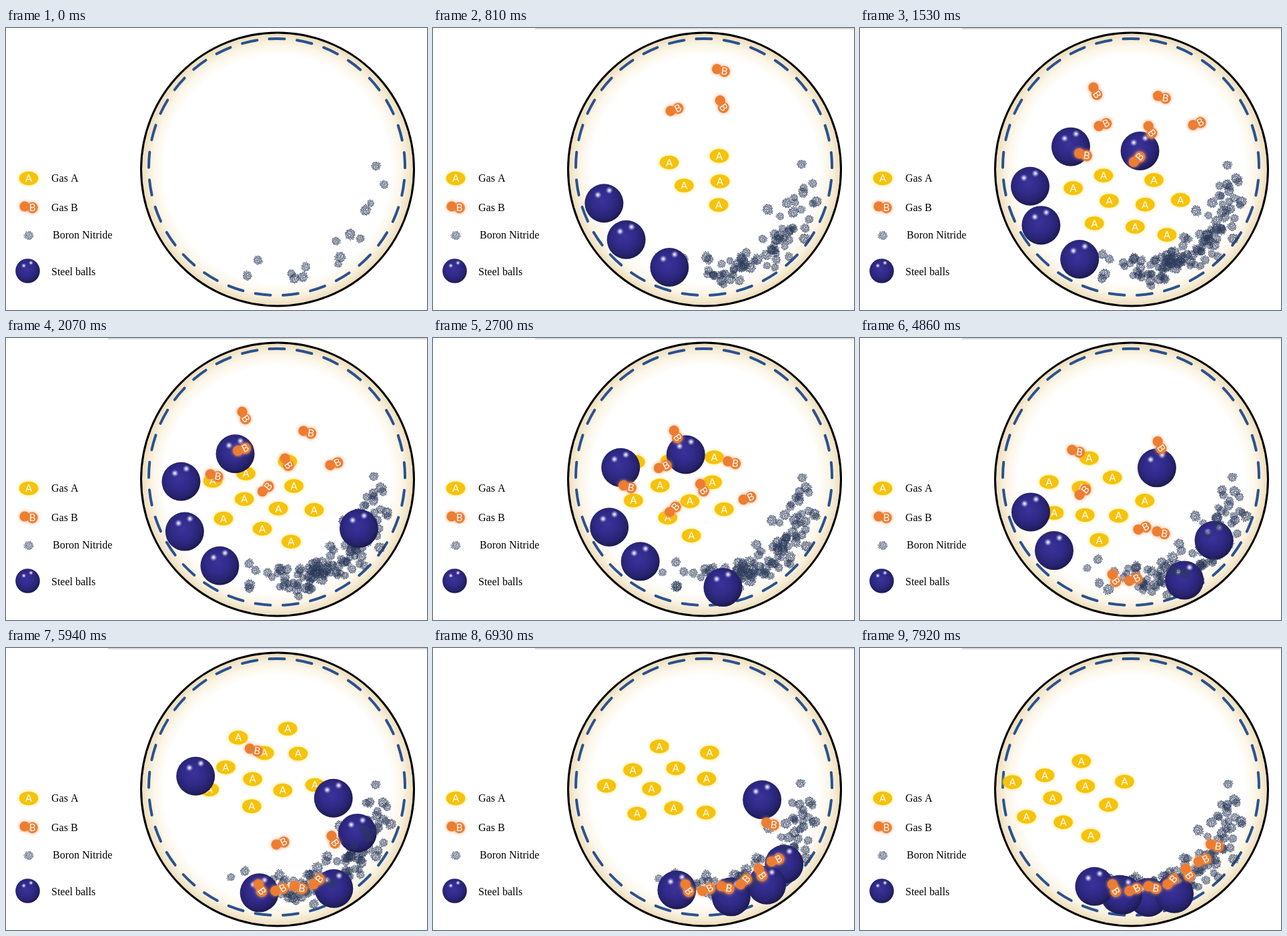
Recreate the animation shown at these times as an HTML page with a canvas. Size 631 by 422 pixels, loop 8 s.

```html
<!DOCTYPE html>
<html lang="en">
<head>
<meta charset="utf-8">
<title>Ball mill</title>
<style>
  html, body { margin: 0; width: 100%; height: 100%; overflow: hidden; background: #fff; }
  canvas { display: block; }
</style>
</head>
<body>
<canvas id="stage" width="631" height="422"></canvas>
<script>
const ctx = document.getElementById('stage').getContext('2d');
const LOOP = 8000, STEP = 90, TAU = Math.PI * 2, GOLDEN = 2.39996;
const KEYS = [0, 1530, 2700, 3690, 4860, 5940, 7920];
const DRUM = { x: 407, y: 211.5, r: 204.5 };
const RING = { x: 406, y: 208, r: 192, dashes: 29, dash: 23 };

// Balls tumble clockwise on a tilted ellipse; each row is one ball's angle at the key times.
const TUMBLE = { x: 392.5, y: 273, a: 143, b: 93, tilt: 20 };
const BALL_ANGLES = [
  [80, 104, 113, 137, 158, 302, 420],
  [110, 138, 145, 173, 279, 333, 438],
  [140, 172, 203, 318, 348, 391, 436],
  [180, 223, 251, 382, 394, 442, 454],
  [220, 268, 419, 433, 484, 565, 762]
];
// Centres of the two drifting gas clouds at the key times.
const CLOUD_A = [[410, 190], [410, 255], [375, 230], [430, 130], [345, 250], [385, 185], [310, 225]];
const CLOUD_B = [[400, 70], [412, 140], [390, 205], [397, 235], [405, 215], [420, 220], [420, 220]];
const TILTS_B = [55, -28, 8, -50];

const rad = degrees => degrees * Math.PI / 180;
const lerp = (a, b, u) => a + (b - a) * u;
const mix = (p, q, u) => [lerp(p[0], q[0], u), lerp(p[1], q[1], u)];
const clamp = u => Math.max(0, Math.min(1, u));
const onDrum = (degrees, r) =>
  [DRUM.x + r * Math.cos(rad(degrees)), DRUM.y + r * Math.sin(rad(degrees))];

let seed = 11;
const random = () => (seed = seed * 16807 % 2147483647) / 2147483647;
const bell = deviation => (random() + random() + random() - 1.5) * 2 * deviation;

// A few grains lie along the wall at first; the rest pile up into a crescent.
const grains = Array.from({ length: 110 }, (_, i) => {
  const early = i < 15;
  const degrees = early ? 4 + i * 7.5 + bell(4) : 56 + bell(27);
  const [x, y] = onDrum(degrees, Math.min(180, 153 + bell(14)));
  return {
    x, y, from: early ? 0 : 90 + random() * 1350, scale: 0.8 + random() * 0.4,
    turn: random() * TAU, phase: random() * TAU, inFront: random() < 0.15
  };
});

const grainShape = new Path2D();
for (let i = 0; i < 46; i++) {
  const r = Math.sqrt(i) * 1.02 + random() * 0.7;
  const x = r * Math.cos(i * GOLDEN), y = r * Math.sin(i * GOLDEN) * 0.88;
  grainShape.moveTo(x + 0.8, y);
  grainShape.arc(x, y, 0.8, 0, TAU);
}

function segment(time) {
  let i = 0;
  while (i < KEYS.length - 2 && time >= KEYS[i + 1]) i++;
  return [i, (time - KEYS[i]) / (KEYS[i + 1] - KEYS[i])];
}

function cloudPoint(centres, i, count, time, width, height) {
  const [k, u] = segment(time);
  const [x, y] = mix(centres[k], centres[k + 1], u);
  const angle = i * GOLDEN + time / 2500, r = Math.sqrt((i + 0.5) / count);
  return [x + r * width * Math.cos(angle), y + r * height * Math.sin(angle)];
}

const gasAPoint = (i, time) => cloudPoint(CLOUD_A, i, 10, time, 95, 72);

// Gas B drifts until each molecule is caught by the powder.
function gasBPoint(i, time) {
  const caught = clamp((time - 3600 - i * 450) / 800);
  return mix(cloudPoint(CLOUD_B, i, 7, time, 105, 80), onDrum(100 - i * 11, 150), caught);
}

function ballPoint(angles, time) {
  const [k, u] = segment(time);
  const angle = rad(lerp(angles[k], angles[k + 1], u)), tilt = rad(TUMBLE.tilt);
  const along = TUMBLE.a * Math.cos(angle), across = TUMBLE.b * Math.sin(angle);
  return [
    TUMBLE.x + along * Math.cos(tilt) - across * Math.sin(tilt),
    TUMBLE.y + along * Math.sin(tilt) + across * Math.cos(tilt)
  ];
}

function placed(x, y, draw, angle = 0, scale = 1) {
  ctx.save();
  ctx.translate(x, y);
  ctx.rotate(angle);
  ctx.scale(scale, scale);
  draw();
  ctx.restore();
}

function disc(x, y, rx, fill, ry = rx) {
  ctx.beginPath();
  ctx.ellipse(x, y, rx, ry, 0, 0, TAU);
  ctx.fillStyle = fill;
  ctx.fill();
}

function radial(x, y, r, stops) {
  const gradient = ctx.createRadialGradient(x, y, 0, x, y, r);
  stops.forEach(([at, color]) => gradient.addColorStop(at, color));
  return gradient;
}

function letter(text, x, y) {
  ctx.shadowBlur = 0;
  ctx.font = '15px Lato, sans-serif';
  ctx.textAlign = 'center';
  ctx.fillStyle = '#fff';
  ctx.fillText(text, x, y + 5.3);
}

function glow(color) {
  ctx.shadowColor = color;
  ctx.shadowBlur = 5;
}

function drawGasA(x, y) {
  placed(x, y, () => {
    glow('#ffe94a');
    disc(0, 0, 14.3, '#f6c20c', 10.3);
    letter('A', 0, 0);
  });
}

function drawGasB(x, y, degrees) {
  placed(x, y, () => {
    glow('#ff9d66');
    disc(5.5, 1, 8.2, '#ed7d31');
    disc(-6, -1, 7.6, '#ed7d31');
    letter('B', 5.5, 0.5);
  }, rad(degrees));
}

function drawBall(x, y, r) {
  placed(x, y, () => {
    disc(0, 0, 1, radial(-0.1, -0.15, 1.15, [
      [0, '#3b3399'], [0.5, '#302a89'], [0.8, '#28236f'], [1, '#1c1a50']
    ]));
    for (const [sx, sy] of [[-0.32, -0.43], [0.27, -0.66]]) {
      disc(sx, sy, 0.2, radial(sx, sy, 0.2, [
        [0, '#fff'], [0.3, '#e4e2ffcc'], [1, '#8c86e000']
      ]));
    }
  }, 0, r);
}

function drawGrain(x, y, turn = 0, scale = 1) {
  placed(x, y, () => {
    ctx.fillStyle = '#2c3959d9';
    ctx.fill(grainShape);
  }, turn, scale);
}

function drawDrum() {
  const { x, y, r } = DRUM;
  disc(x, y, r, radial(x, y, r, [
    [0, '#fff'], [0.83, '#fff'], [0.91, '#fcf6e8'], [0.96, '#f4e9d0'], [1, '#eadcb9']
  ]));
  ctx.lineWidth = 3;
  ctx.strokeStyle = '#000';
  ctx.stroke();

  placed(RING.x, RING.y, () => {
    ctx.setLineDash([RING.dash, TAU * RING.r / RING.dashes - RING.dash]);
    ctx.lineCap = 'round';
    ctx.lineWidth = 4;
    ctx.strokeStyle = '#2a5291';
    ctx.beginPath();
    ctx.arc(0, 0, RING.r, 0, TAU);
    ctx.stroke();
  }, -Math.PI / 2 - RING.dash / 2 / RING.r);
}

function drawLegend() {
  drawGasA(34, 225);
  drawGasB(34, 268, 0);
  drawGrain(34, 310.5);
  drawBall(32.5, 363.5, 18.3);
  ctx.font = '16px "Liberation Serif", serif';
  ctx.textAlign = 'left';
  ctx.fillStyle = '#000';
  ctx.fillText('Gas A', 68, 230);
  ctx.fillText('Gas B', 68, 274);
  ctx.fillText('Boron Nitride', 70, 315);
  ctx.fillText('Steel balls', 68, 370);
}

function drawTopEdge() {
  const shade = ctx.createLinearGradient(0, 0, 0, 3);
  shade.addColorStop(0, '#c9c9c9');
  shade.addColorStop(1, '#fff');
  ctx.fillStyle = shade;
  ctx.fillRect(153, 0, 478, 3);
}

function drawGrains(time, front) {
  const sway = clamp(time / 1000) * 4;
  for (const g of grains) {
    if (time < g.from || (g.inFront && time > 4500) !== front) continue;
    drawGrain(g.x + sway * Math.sin(time / 900 + g.phase),
      g.y + sway * Math.cos(time / 1100 + g.phase), g.turn, g.scale);
  }
}

function render(time) {
  ctx.fillStyle = '#fff';
  ctx.fillRect(0, 0, 631, 422);
  if (time >= STEP) drawTopEdge();
  drawDrum();
  drawLegend();
  drawGrains(time, false);
  for (let i = 0; i < 10; i++) {
    if (time >= 500 + i * 70) drawGasA(...gasAPoint(i, time));
  }
  BALL_ANGLES.forEach((angles, i) => {
    if (time >= 300 + i * 200) drawBall(...ballPoint(angles, time), 29);
  });
  drawGrains(time, true);
  for (let i = 0; i < 7; i++) {
    if (time >= 600 + i * 90) drawGasB(...gasBPoint(i, time), TILTS_B[i % 4]);
  }
}

const start = performance.now();
function tick() {
  const time = (performance.now() - start) % LOOP;
  render(Math.floor(time / STEP) * STEP);
  requestAnimationFrame(tick);
}
tick();
</script>
</body>
</html>
```
